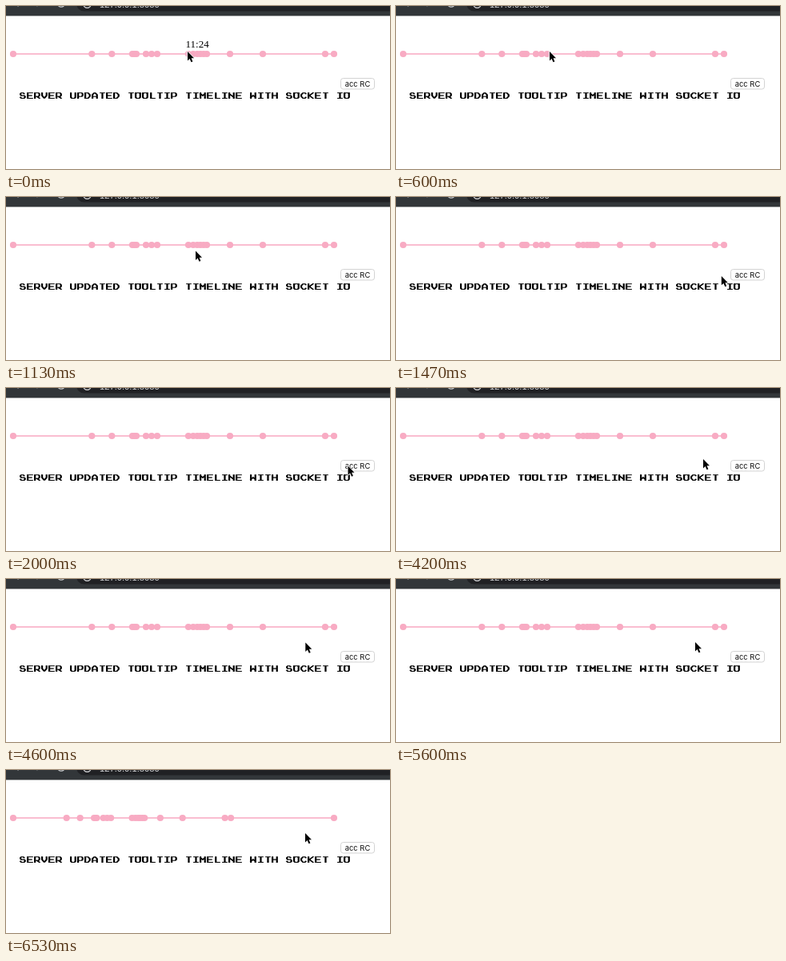
An HTML page that plays this animation: 480x204 px, repeating every 8 s.

```html
<!DOCTYPE html>
<html lang="en">
<head>
<meta charset="utf-8">
<title>Timeline</title>
<style>
  html, body { margin: 0; width: 100%; height: 100%; overflow: hidden; background: #fff; }
  svg { display: block; width: 100%; height: 100%; }
  .time { font: 13px "Liberation Serif", serif; }
  .label { font: 9.4px Inter, sans-serif; text-anchor: middle; }
  .url { font: 11.2px "Liberation Sans", sans-serif; fill: #d5d7da; }
  .copy { font: 15px "Liberation Mono", monospace; fill-opacity: 0; }
</style>
</head>
<body>
<svg viewBox="0 0 480 204" xmlns="http://www.w3.org/2000/svg">
  <defs>
    <linearGradient id="press" x2="0" y2="1">
      <stop stop-color="#64a8f8"/>
      <stop offset="1" stop-color="#1c6ff0"/>
    </linearGradient>
  </defs>
  <rect width="480" height="204" fill="#fff"/>

  <g id="browser">
    <rect width="480" height="12.4" fill="#323639"/>
    <rect x="88" y="-13" width="420" height="19.5" rx="9.7" fill="#202124"/>
    <g fill="none" stroke="#d5d7da" stroke-width="1.3">
      <path d="M11 -4L15.5 .4"/>
      <path d="M43 -4L38.5 .4" stroke="#85888c"/>
      <circle cx="69" cy="-3.4" r="4.6"/>
      <circle cx="101.500" cy="-2.200" r="4.600"/>
    </g>
    <text class="url" x="117" y="2.200">127.0.0.1:8080</text>
  </g>

  <path d="M9 60H410" stroke="#fabdd0" stroke-width="2"/>
  <g id="dots" fill="#f8abc3"></g>
  <text id="tip" class="time" y="51.7"></text>

  <path id="title" transform="translate(18.1 108.7) scale(2.25 1.125)" fill="none" stroke="#000"
    stroke-linecap="square" stroke-miterlimit="2"/>
  <text id="copy" class="copy" x="17" y="116"></text>

  <rect id="button" x="418.5" y="90.5" width="42" height="13.5" rx="3" stroke="#cfcfcf" stroke-width=".9"/>
  <text id="label" class="label" x="439.5" y="100.700">acc RC</text>

  <path id="cursor" d="M0 0V11.4L2.600 9L4.500 13.300L6.400 12.500L4.600 8.300H8Z" stroke="#fff"
    stroke-width="1.400" stroke-linejoin="round" paint-order="stroke"/>
</svg>
<script>
const LOOP = 8000, FPS = 15;
const START = 9, END = 410, SHRINK = 0.6785;
const TITLE = 'SERVER UPDATED TOOLTIP TIMELINE WITH SOCKET IO';
const STOPS = [107.3, 132.3, 158, 160.5, 163, 175, 182, 189, 228, 234,
  239, 243, 247, 251, 280, 321, 399, END];

// Pointer path: time, x, y
const PATH = [
  [0, 227, 57], [67, 226, 57], [133, 223, 57], [200, 223, 57],
  [600, 192, 57], [800, 187, 58.5], [1000, 187, 58.5], [1200, 262, 72],
  [1467, 407, 99], [1600, 425, 104], [1733, 427.5, 97.5], [3733, 427.5, 97.5],
  [3950, 408, 94], [4200, 384, 89], [4400, 377, 82], [4600, 374.3, 79.5],
  [4733, 374.3, 79.5], [4800, 374, 79], [LOOP, 374, 79]
];

// Lettering drawn with a pen twice as wide as it is high
const stems = 'M0 0V6M2.5 0V6';
const G = {
  A: 'M0 6V2L1 0H1.5L2.5 2V6M0 4H2.5',
  C: 'M2.5 1L2 0H1L0 2V4L1 6H2L2.5 5',
  D: 'M0 0H1.5L2.5 2V4L1.5 6H0Z',
  E: 'M2.5 0H0V6H2.5M0 3H2',
  H: stems + 'M0 3H2.5',
  K: 'M0 0V6M2.5 0L.5 3L2.5 6',
  L: 'M.5 0V6H2.5',
  M: stems + 'M0 1L1.25 3L2.5 1',
  N: stems + 'M0 1L2.5 5',
  P: 'M0 6V0H2L2.5 1V3L2 4H0',
  S: 'M2 1L1.5 0H.5L0 1V2L.5 3H2L2.5 4V5L2 6H.5L0 5',
  T: 'M.5 0H2.5M1.5 0V6',
  U: 'M0 0V5L.5 6H2L2.5 5V0',
  V: 'M0 0V3L1.25 6L2.5 3V0',
  W: stems + 'M0 5L1.25 3L2.5 5'
};
G.I = G.T + 'M.5 6H2.5';
G.O = G.U + 'M0 1L.5 0H2L2.5 1';
G.R = G.P + 'M1 4L2.5 6';

const $ = id => document.getElementById(id);
const set = (el, attrs) => { for (const k in attrs) el.setAttribute(k, attrs[k]); };
const clamp = v => Math.max(0, Math.min(1, v));
const mix = (a, b, u) => a + (b - a) * u;
const smooth = u => u * u * (3 - 2 * u);

// Shift the absolute x values of a glyph
const shift = (d, dx) => d.replace(/([MLH])([\d.]+)/g, (m, c, x) => c + (+x + dx));

function addDot(x) {
  const dot = document.createElementNS('http://www.w3.org/2000/svg', 'circle');
  set(dot, { cx: x, cy: 60, r: 4.1 });
  $('dots').append(dot);
  return dot;
}

set($('title'), { d: [...TITLE].map((c, i) => shift(G[c] || '', i * 4)).join('') });
$('copy').textContent = TITLE;
addDot(START);
const moving = STOPS.map(addDot);
const newest = addDot(END);

function pointer(t) {
  const i = PATH.findIndex(p => p[0] > t);
  const [t0, x0, y0] = PATH[i - 1], [t1, x1, y1] = PATH[i];
  const u = (t - t0) / (t1 - t0);
  return [mix(x0, x1, u), mix(y0, y1, u)];
}

function showTip(t) {
  const second = t > 640 && t < 1100;
  $('tip').textContent = second ? '11:21' : '11:24';
  set($('tip'), { x: second ? 185.5 : 224.5, opacity: second ? 1 : clamp(1 - t / 133) });
}

function draw(time) {
  const t = Math.floor((time % LOOP + 4) * FPS / 1000) * 1000 / FPS % LOOP;
  const scale = mix(1, SHRINK, smooth(clamp((t - 6133) / 400)));
  moving.forEach((dot, i) => set(dot, { cx: START + (STOPS[i] - START) * scale }));
  set(newest, { visibility: t > 6190 ? 'visible' : 'hidden' });
  showTip(t);

  const down = t > 1860 && t < 1995;
  set($('button'), { fill: down ? 'url(#press)' : '#fff' });
  set($('label'), { fill: down ? '#fff' : '#111' });
  set($('cursor'), { transform: `translate(${pointer(t)})` });
}

const begin = performance.now();
function tick() {
  draw(performance.now() - begin);
  requestAnimationFrame(tick);
}
tick();
</script>
</body>
</html>
```
